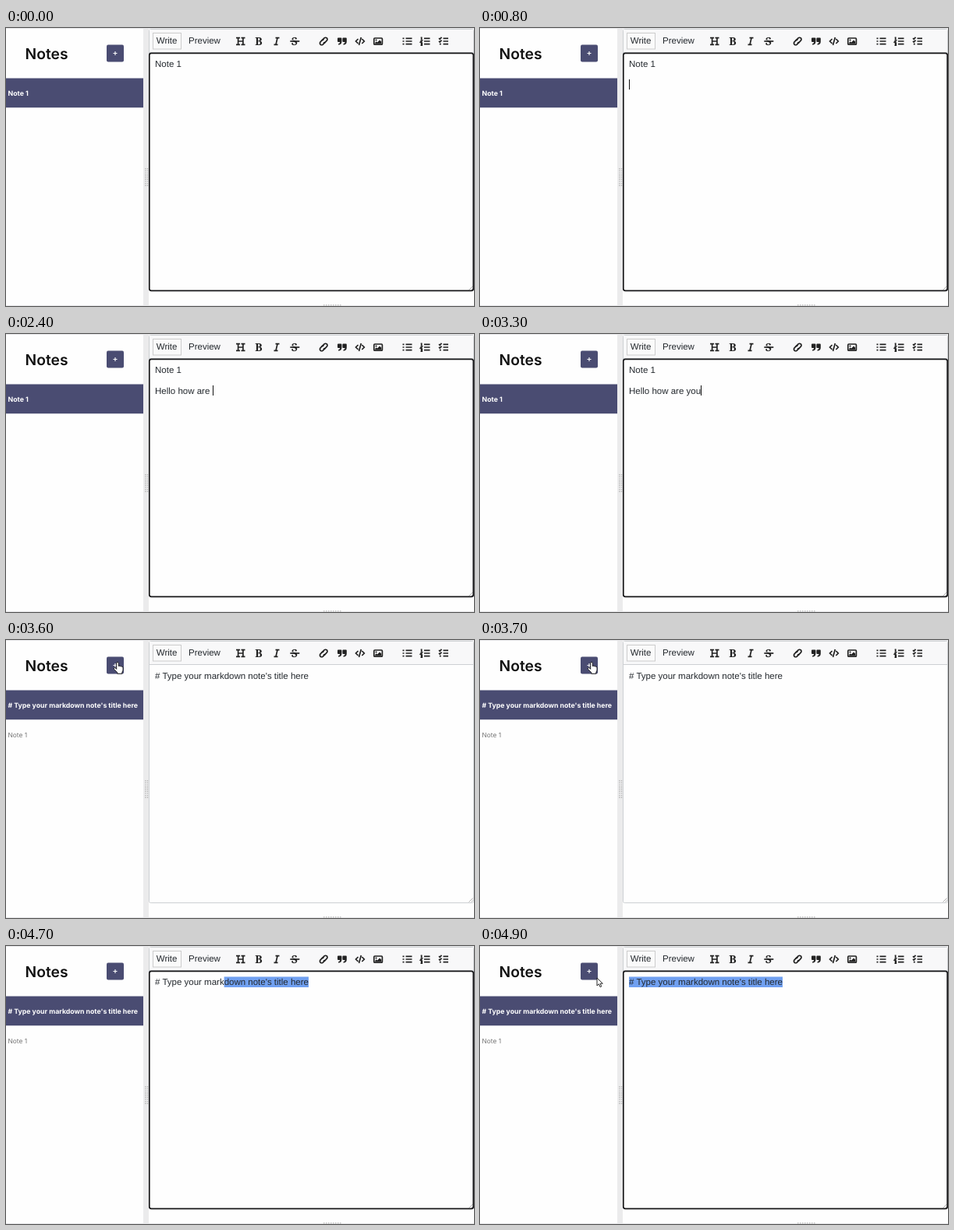
Recreate the animation shown at these times as an HTML page. Size 600 by 357 pixels, loop 5000 ms.

```html
<!DOCTYPE html>
<html lang="en">
<head>
<meta charset="utf-8">
<title>Notes</title>
<style>
  html, body { margin: 0; width: 100%; height: 100%; overflow: hidden; background: #fefefe; }
  svg { display: block; width: 600px; height: 357px; }
  text { white-space: pre; text-rendering: geometricPrecision; }
  .ui { font: 11.5px "Liberation Sans", Arial, sans-serif; fill: #24292e; }
  .side { font-family: Inter, sans-serif; }
  .item { font-size: 8.75px; font-weight: 700; fill: #fff; }
  .slab { font: 700 14px "Noto Serif", serif; fill: #222; }
  .icon { fill: none; stroke: #222; stroke-width: 1.7; }
  .solid { fill: #222; }
</style>
</head>
<body>
<svg viewBox="0 0 600 357">
  <rect width="600" height="357" fill="#fefefe"/>
  <path d="M0 .5H600M0 356.5H600" stroke="#e6e6e8"/>

  <g class="side">
    <text x="24.5" y="39.5" font-size="19.3" font-weight="600" fill="#111">Notes</text>
    <rect x="129" y="21.5" width="22" height="22" rx="2" fill="#4a4c72"/>
    <path d="M137.5 32.5h5M140 30v5" stroke="#fff" stroke-width="1.1"/>
    <rect y="64.5" width="176" height="37.7" fill="#4a4c72"/>
    <text id="current" class="item" x="2.5" y="86.8"></text>
    <text id="older" x="2.5" y="125" font-size="8.4" fill="#777">Note 1</text>
  </g>

  <rect x="176" y="1" width="7" height="355" fill="#ebebec"/>
  <path d="M178.9 180v23M181.5 180v23" stroke="#b4b4b4" stroke-width="1.3" stroke-dasharray="1.4 1.3"/>
  <path d="M407 355.8h24" stroke="#b4b4b4" stroke-width="1.2" stroke-dasharray="1.5 1.5"/>

  <rect x="183.5" y="1.5" width="416" height="336" rx="2" fill="#fefefe" stroke="#cdd0d3"/>
  <path d="M184 2H599V31H184z" fill="#f8f8f9"/>
  <path d="M184 31.5H599" stroke="#cdd0d3"/>
  <rect x="188.5" y="6.5" width="36" height="20.5" fill="#fafafa" stroke="#ccc"/>
  <text class="ui" x="192.8" y="20.4">Write</text>
  <text class="ui" x="234" y="20.4">Preview</text>

  <path class="icon" d="M295 12.7h5M301.500 12.7h5M295 21.3h5M301.500 21.3h5M297.6 12.500v9M303.900 12.500v9M297.500 17h6.500"/>
  <text class="slab" x="319.3" y="22">B</text>
  <path class="icon" d="M345.500 12.700h5M343.500 21.300h5M348 12.700l-2 8.600"/>
  <text class="slab" x="365.8" y="22">S</text>
  <path d="M364 15.600h12.500" stroke="#f8f8f9" stroke-width=".8"/>
  <path class="icon" d="M364.300 17h12" stroke-width="1.3"/>
  <g class="icon" transform="translate(407.200 17) rotate(-45)">
    <path d="M1 2.300H-3.500a2.300 2.300 0 0 1 0-4.600H-.500a2.300 2.300 0 0 1 2 1.300"/>
    <path d="M-1-2.300H3.500a2.300 2.300 0 0 1 0 4.600H.500a2.300 2.300 0 0 1-2-1.300"/>
  </g>
  <g class="solid">
    <path id="quote" d="M426 12.600h3.400q1 0 1 1v4q0 4-4.200 4.200v-1.700q2-.1 2-2.100h-2.200q-1 0-1-1v-3.400q0-1 1-1z"/>
    <use href="#quote" x="6.400"/>
  </g>
  <path class="icon" stroke-width="1.400" d="M451.500 14l-3 3 3 3M456.300 14l3 3-3 3M455.300 12l-2.800 10"/>
  <rect class="icon" x="471.800" y="13" width="10.600" height="8.200" rx="1" stroke-width="1.400"/>
  <circle class="solid" cx="474.600" cy="15.500" r="1.100"/>
  <path class="solid" d="M473.300 20v-1.300l1.500-1.500 1.200 1.200 3-3 2.200 2.200V20z"/>
  <path class="icon" d="M512.500 13.300h8M512.500 17h8M512.500 20.700h8M536 13.300h7.500M536 17h7.500M536 20.700h7.500M560.500 13.300h6.500M560.500 17h6.500M560.500 20.700h6.500"/>
  <path class="icon" stroke-width="2" d="M508.500 13.300h2M508.500 17h2M508.500 20.700h2M555.800 20.700h2"/>
  <path class="icon" stroke-width=".9" d="M531.700 12.300h1v2.800M531.500 16h1.800l-1.800 2h2M531.500 19.300h1.800v2.800h-1.800M532 20.700h1.300"/>
  <path class="icon" stroke-width="1.200" d="M555 13.100l1.200 1.200 2.300-2.500M555 16.900l1.200 1.200 2.300-2.500"/>

  <path d="M593.500 336.500l5-5M596.500 336.500l2-2" stroke="#999" stroke-width=".8"/>
  <rect id="selection" x="191" y="39.500" width="0" height="13.500" fill="#70a0f1"/>
  <text id="line1" class="ui" x="191" y="50"></text>
  <text id="line2" class="ui" x="191" y="76.500"></text>
  <rect id="caret" width="1" height="13" fill="#111"/>
  <rect id="focus" x="183.800" y="32.300" width="415.400" height="305" rx="2.500" fill="none" stroke="#18181a" stroke-width="1.700"/>

  <g fill="#fff" stroke="#111" stroke-width=".9" stroke-linejoin="round">
    <path id="arrow" d="M0 0V10l2.400-2.200 1.700 3.900 1.700-.8-1.700-3.700h3.200z"/>
    <path id="hand" d="M-1.300 7V1.200q0-1.200 1.300-1.200t1.300 1.200V5q1.200-.8 2.100.3 1.200-.6 2 .5 1.600-.3 1.600 1.400v2.600q0 1.700-1.200 3v2h-6v-1.600L-4.500 8.900q-.7-1.500.8-1.900 1 0 2.400 1.900z"/>
  </g>
</svg>
<script>
  const LOOP = 5000;
  const PROMPT = "# Type your markdown note's title here";
  const MESSAGE = "Hello how are you";
  // Moment at which each character of the message is typed.
  const KEYS = [1100, 1200, 1300, 1400, 1500, 1600, 1800, 1800, 1900, 2000,
                2100, 2200, 2200, 2300, 2600, 2600, 2700];
  // Each step: start time, pointer shape, x, y.
  const POINTER = [
    [0], [3400, "arrow", 160, 46], [3500, "hand", 143, 28.5], [3900, "arrow", 150, 50],
    [4000, "arrow", 166, 137], [4100], [4800, "arrow", 168, 46], [4900, "arrow", 150, 41]
  ];

  const $ = id => document.getElementById(id);
  const show = (id, on) => $(id).setAttribute("visibility", on ? "visible" : "hidden");
  const within = (t, a, b) => t >= a && t < b;

  function setText(id, value) {
    if ($(id).textContent !== value) $(id).textContent = value;
  }

  function drawCaret(t, added) {
    show("caret", within(t, 300, 500) || within(t, 700, 3000) || within(t, 3300, 3600));
    const line = t < 700 ? "line1" : "line2";
    const width = t < 700 || added ? $(line).getComputedTextLength() : 0;
    $("caret").setAttribute("x", Math.round(191 + width));
    $("caret").setAttribute("y", t < 700 ? 39.5 : t < 800 ? 53 : 66);
  }

  function drawSelection(t) {
    const full = $("line1").getComputedTextLength();
    const from = t < 4700 ? full : t < 4800 ? full * 0.45 : 0;
    $("selection").setAttribute("x", 191 + from);
    $("selection").setAttribute("width", full - from);
  }

  function drawPointer(t) {
    const [, shape, x, y] = POINTER.filter(step => step[0] <= t).pop();
    for (const id of ["arrow", "hand"]) show(id, id === shape);
    if (shape) $(shape).setAttribute("transform", `translate(${x} ${y})`);
  }

  function render(t) {
    const fresh = t >= 3600;
    const title = fresh ? PROMPT : "Note 1";
    const added = fresh ? 0 : KEYS.filter(k => k <= t).length;
    setText("current", title);
    setText("line1", title);
    setText("line2", MESSAGE.slice(0, added));
    show("older", fresh);
    show("focus", !fresh || t >= 4700);
    drawCaret(t, added);
    drawSelection(t);
    drawPointer(t);
  }

  const start = performance.now();
  function tick() {
    render((performance.now() - start) % LOOP);
    requestAnimationFrame(tick);
  }
  tick();
</script>
</body>
</html>
```
